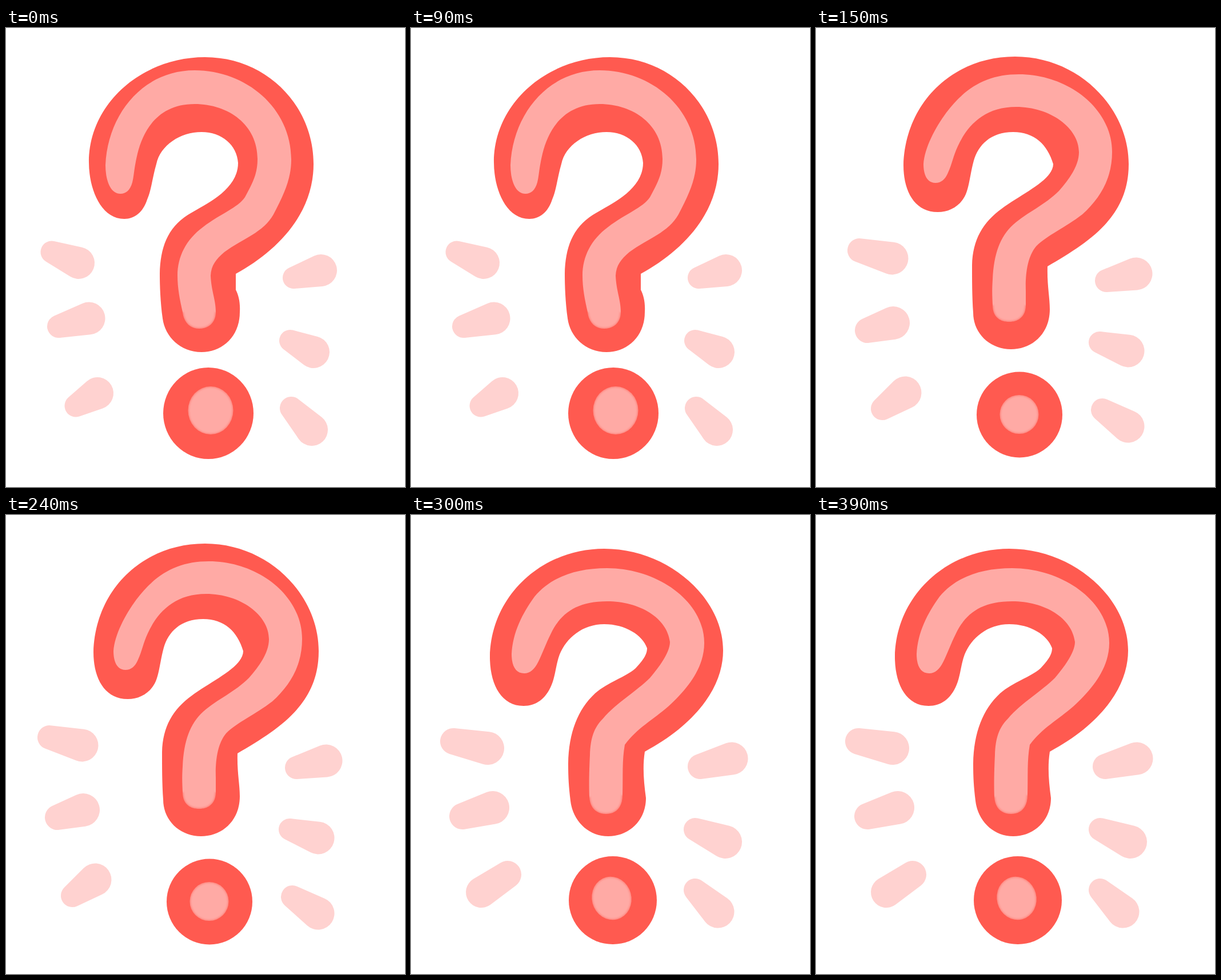
These frames come from a looping animation (698 by 803 pixels, 0.45 s). An HTML page:

```html
<!DOCTYPE html>
<html lang="en">
<head>
<meta charset="utf-8">
<title>Question mark</title>
<style>
  html, body { margin: 0; width: 100%; height: 100%; overflow: hidden; background: #fff; }
  svg { display: block; width: 100%; height: 100%; }
  .pose { visibility: hidden; animation: show 450ms step-end infinite; }
  .pose:nth-of-type(2) { animation-delay: -300ms; }
  .pose:nth-of-type(3) { animation-delay: -150ms; }
  @keyframes show {
    0% { visibility: visible; }
    33.3333%, 100% { visibility: hidden; }
  }
  .body { fill: #ff5a50; }
  .light { fill: #ffaaa5; }
  .dash { fill: #ffd2d0; }
  .soft { fill: none; stroke: #ff5a50; stroke-width: 3; opacity: .5; filter: url(#blur); }
</style>
</head>
<body>
<svg id="stage" viewBox="0 0 698 803">
  <defs>
    <filter id="blur" x="-20%" y="-50%" width="140%" height="200%"><feGaussianBlur stdDeviation="1.5"/></filter>
  </defs>

  <g class="pose">
    <path class="body" d="M348 51C455 51 538 135 538 238C538 325 475 390 402 430L402 458C407 468 410 480 409 497C409 540 378 567 342 567C305 567 278 540 274 508C270 480 269 450 269 430C270 385 282 350 318 327C345 310 406 285 406 236C404 205 378 182 342 182C305 182 270 205 263 238C256 262 254 285 247 300C240 322 225 334 207 334C165 334 145 280 145 235C145 130 240 51 348 51Z"/>
    <path class="light" d="M330 74C420 74 499 140 499 230C499 262 488 288 468 326C450 358 415 368 382 392C367 405 359 415 358 433C359 460 367 475 367 497C367 515 355 526 338 526C322 526 311 515 309 497C304 475 300 455 300 433C300 400 315 370 345 348C375 325 405 315 418 296C432 270 440 255 440 229C440 170 390 133 330 133C265 133 240 180 230 220C224 245 224 258 221 270C217 284 210 290 200 290C182 290 174 265 174 240C178 150 240 74 330 74Z"/>
    <path class="soft" d="M367 497C367 515 355 526 338 526C322 526 311 515 309 497"/>
    <ellipse class="body" cx="354" cy="674" rx="79" ry="80"/>
    <ellipse class="light" cx="358" cy="669" rx="39.5" ry="42"/>
    <ellipse class="soft" cx="358" cy="669" rx="39.5" ry="42"/>
  </g>

  <g class="pose">
    <path class="body" d="M348 50C460 50 547 140 547 238C547 330 480 373 405 417C404 450 409 470 409 492C409 535 378 562 341 562C305 562 275 535 275 498C273 470 273 440 273 415C274 370 292 340 325 316C360 290 415 266 415 238C405 204 382 182 345 182C305 182 284 205 276 232C269 258 268 280 260 295C250 313 232 322 213 322C172 322 153 285 153 240C156 130 240 50 348 50Z"/>
    <path class="light" d="M355 81C440 81 518 140 518 217C518 260 500 295 466 326C435 350 405 362 385 382C370 400 366 430 367 460L367 485C367 504 355 514 338 514C320 514 309 504 309 485C308 465 308 455 309 440C311 395 322 365 345 344C370 322 400 310 425 285C445 262 460 240 460 217C460 175 410 138 350 138C295 138 265 170 248 207C240 224 238 238 231 253C226 265 219 271 209 271C195 271 188 258 188 238C190 210 208 175 228 148C262 103 300 81 355 81Z"/>
    <path class="soft" d="M367 485C367 504 355 514 338 514C320 514 309 504 309 485"/>
    <circle class="body" cx="356" cy="676.5" r="75"/>
    <circle class="light" cx="355.5" cy="676" r="34"/>
    <circle class="soft" cx="355.5" cy="676" r="34"/>
  </g>

  <g class="pose">
    <path class="body" d="M338 59C450 59 546 145 546 237C546 300 500 365 409 414C405 440 407 465 411 495C411 535 381 562 345 562C310 562 283 535 279 500C276 475 275 460 275 435C276 380 292 340 322 312C345 292 375 284 393 268C405 255 413 245 413 233C405 210 375 191 338 191C300 191 272 215 260 244C253 263 253 280 246 297C236 322 218 334 197 334C157 334 138 295 138 248C140 140 230 59 338 59Z"/>
    <path class="light" d="M343 93C430 93 513 150 513 224C513 268 483 305 450 335C425 357 395 373 374 402C369 430 371 455 370 490C370 512 358 523 341 523C324 523 313 512 312 493C311 470 312 440 313 420C314 390 320 372 336 356C360 328 395 308 418 285C435 265 453 240 453 222C448 180 400 151 343 151C290 151 262 172 245 207C235 227 229 245 222 258C216 270 208 277 198 277C183 277 176 264 176 243C178 205 195 172 216 143C245 108 290 93 343 93Z"/>
    <path class="soft" d="M370 490C370 512 358 523 341 523C324 523 313 512 312 493"/>
    <circle class="body" cx="353" cy="674" r="77"/>
    <ellipse class="light" cx="351" cy="670.5" rx="34.5" ry="38" transform="rotate(-15 351 670.5)"/>
    <ellipse class="soft" cx="351" cy="670.5" rx="34.5" ry="38" transform="rotate(-15 351 670.5)"/>
  </g>
</svg>
<script>
  // Each dash is two end circles: x, y, r, x, y, r
  const dashes = [
    [[80, 392, 19.5, 127, 411, 28], [92, 522, 20, 145, 508, 28.5], [122, 661, 19.5, 160, 639, 28],
     [503, 437, 19, 551, 424, 28], [497, 547, 19, 538, 567, 28], [499, 665, 20, 535, 703, 28]],
    [[76, 389, 21, 133, 403, 28.5], [90, 529, 22, 135, 516, 29], [116, 666, 20, 156, 638, 28.5],
     [508, 442, 20, 560, 430, 28.5], [496, 550, 19, 546, 565, 28.5], [501, 668, 20, 546, 697, 28.5]],
    [[74, 396, 23, 134, 408, 29], [90, 527, 23, 143, 512, 29], [123, 660, 27, 169, 629, 24],
     [506, 440, 22, 561, 426, 28.5], [497, 550, 20, 550, 572, 29], [497, 656, 20, 537, 694, 28.5]]
  ];

  // Outline around two circles, joined by their outer tangents
  function capsule([x1, y1, r1, x2, y2, r2]) {
    const a = Math.atan2(y2 - y1, x2 - x1);
    const b = Math.acos((r1 - r2) / Math.hypot(x2 - x1, y2 - y1));
    const at = (x, y, r, t) => `${x + r * Math.cos(t)} ${y + r * Math.sin(t)}`;
    const wide = b > Math.PI / 2 ? 1 : 0;
    return `M${at(x1, y1, r1, a + b)}A${r1} ${r1} 0 ${1 - wide} 1 ${at(x1, y1, r1, a - b)}` +
           `L${at(x2, y2, r2, a - b)}A${r2} ${r2} 0 ${wide} 1 ${at(x2, y2, r2, a + b)}Z`;
  }

  document.querySelectorAll('.pose').forEach((pose, i) => {
    for (const dash of dashes[i]) {
      const path = document.createElementNS('http://www.w3.org/2000/svg', 'path');
      path.setAttribute('class', 'dash');
      path.setAttribute('d', capsule(dash));
      pose.append(path);
    }
  });
</script>
</body>
</html>
```
